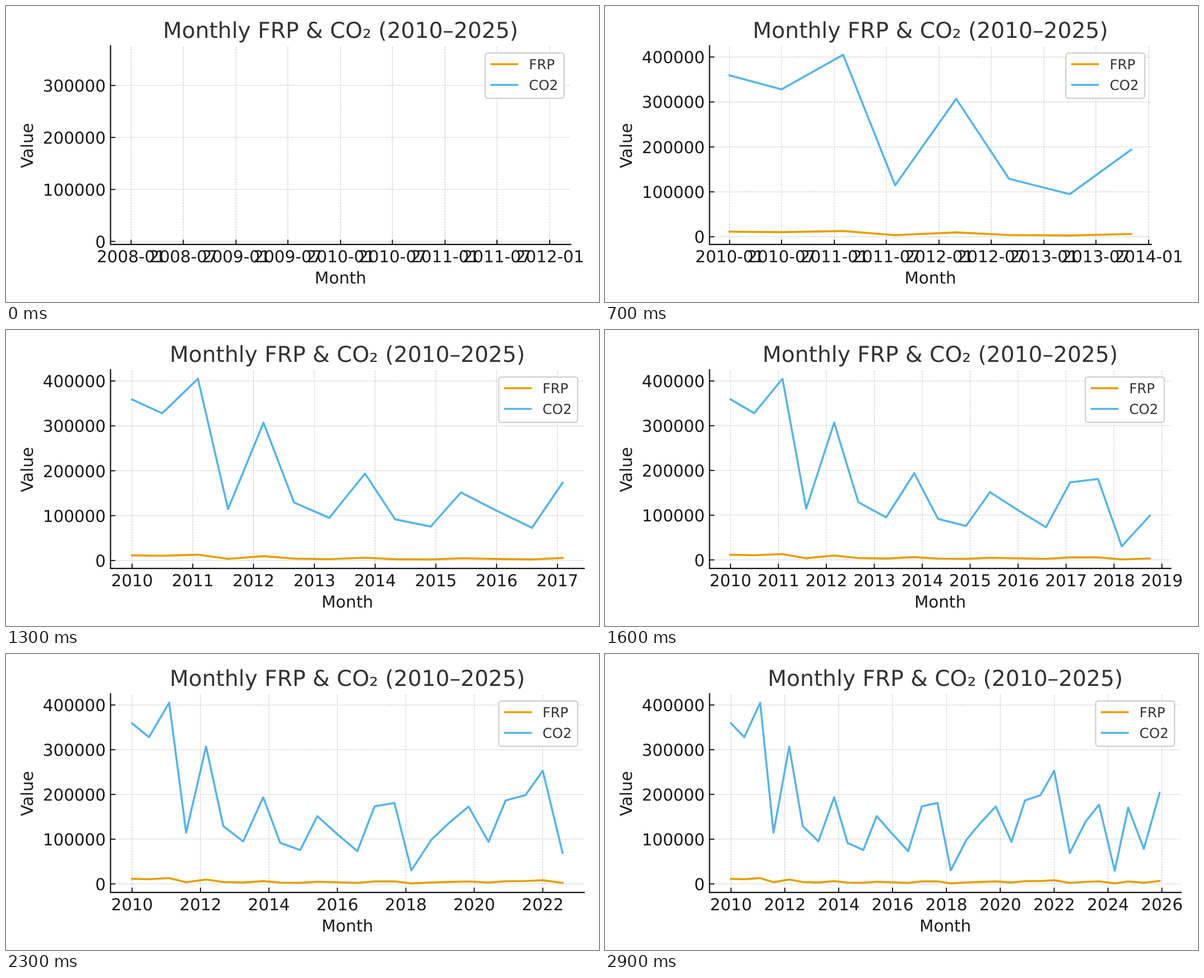
Recreate the animation shown at these times as an HTML page. Size 1058 by 529 pixels, loop 3000 ms.

```html
<!DOCTYPE html>
<html lang="en">
<head>
<meta charset="utf-8">
<title>Monthly FRP &amp; CO₂</title>
<style>
  html, body { margin: 0; width: 100%; height: 100%; overflow: hidden; background: #fff; }
  svg { display: block; font: 29.39px "DejaVu Sans", sans-serif; text-rendering: geometricPrecision; fill: #1a1a1a; }
  path { fill: none; }
  .grid { stroke: #c4c4c4; stroke-width: 1; stroke-dasharray: 3.3 1.5; }
  .axis { stroke: #111; stroke-width: 2.2; stroke-linecap: square; }
  .tick { stroke: #111; stroke-width: 1.9; }
  .line { stroke-width: 3.6; stroke-linejoin: round; stroke-linecap: square; }
  .key { stroke-width: 3.6; }
  .title { font-size: 39.18px; fill: #333; }
  .label { font-size: 24.49px; fill: #333; }
  .mid { text-anchor: middle; }
  .end { text-anchor: end; }
</style>
</head>
<body>
<svg id="chart" width="1058" height="529" viewBox="0 0 1058 529"></svg>
<script>
const FRP = '#e69f00', CO2 = '#56b4e9';
const LEFT = 186.5, TOP = 71, BOTTOM = 426.2, EDGE = 1031.5, FRAME_MS = 100;

// CO2 in thousands, sampled evenly over 192 months
const co2 = [359, 328, 405, 114.5, 307, 129, 95, 193.7, 91.7, 75.7, 151.5, 111, 73, 173.3, 181,
  30.3, 99, 135, 173, 94, 186.5, 198.5, 253, 69, 138.5, 177, 29.3, 170.5, 78.3, 203.5];
const RATIO = 0.0318, COUNT = co2.length;

const day = month => (Date.UTC(2010, month) - Date.UTC(2010, 0)) / 864e5;
const days = co2.map((_, i) => day(Math.floor(i * 191 / (COUNT - 1))));
const path = (cls, d, color) => `<path class="${cls}" d="${d}"${color ? ` stroke="${color}"` : ''}/>`;
const text = (cls, x, y, s, extra = '') => `<text class="${cls}" x="${x}" y="${y}" ${extra}>${s}</text>`;

// Tick spacing in months for a view of the given length
function tickStep(span) {
  const months = Math.floor(span / 30.4375);
  if (months >= 60) return months < 132 ? 12 : 24;
  return [1, 2, 3, 4, 6].find(s => months <= 11 * s);
}

function dateTicks(lo, hi) {
  const step = tickStep(hi - lo), ticks = [];
  for (let m = -24; day(m) <= hi; m += step) {
    if (day(m) < lo) continue;
    const iso = new Date(Date.UTC(2010, m)).toISOString();
    ticks.push({ at: day(m), name: iso.slice(0, step < 12 ? 7 : 4) });
  }
  return ticks;
}

function render(k) {
  const shown = co2.slice(0, k + 1);
  const [from, to] = k ? [0, days[k]] : [-730, 730];
  const padX = (to - from) * 0.05, lo = from - padX, hi = to + padX;
  const min = Math.min(...shown) * RATIO, max = Math.max(...shown);
  const padY = (max - min) * 0.05, bottom = min - padY, top = max + padY;

  // The plot shrinks so that the last date label stays inside the margin
  const ticks = dateTicks(lo, hi), last = ticks[ticks.length - 1];
  const half = last.name.length > 4 ? 61.5 : 37.9;
  const right = Math.min(EDGE, LEFT + (EDGE - half - LEFT) * (hi - lo) / (last.at - lo));
  const center = (LEFT + right) / 2;
  const X = d => LEFT + (d - lo) / (hi - lo) * (right - LEFT);
  const Y = v => BOTTOM - (v - bottom) / (top - bottom) * (BOTTOM - TOP);

  let grid = '', marks = '', labels = '';
  for (const { at, name } of ticks) {
    const x = X(at);
    grid += path('grid', `M${x} ${BOTTOM}V${TOP}`);
    marks += path('tick', `M${x} ${BOTTOM}v-8.6`);
    labels += text('mid', x, 457.8, name);
  }
  for (let v = 0; v < top; v += 100) {
    const y = Y(v);
    grid += path('grid', `M${LEFT} ${y}H${right}`);
    marks += path('tick', `M${LEFT} ${y}h8.6`);
    labels += text('end', 177.9, y + 11, v * 1000);
  }

  const series = (scale, color) => k
    ? path('line', 'M' + shown.map((v, i) => `${X(days[i])} ${Y(v * scale)}`).join('L'), color) : '';
  const legendRow = (name, y, color) =>
    path('key', `M${right - 143} ${y}h49.6`, color) + text('label', right - 74.2, y + 9, name);

  chart.innerHTML = grid + series(RATIO, FRP) + series(1, CO2) + marks
    + path('axis', `M${LEFT} ${TOP}V${BOTTOM}H${right}`) + labels
    + text('title mid', center, 56.5, 'Monthly FRP &amp; CO₂ (2010–2025)')
    + text('mid', center, 496, 'Month')
    + text('mid', 0, 0, 'Value', 'transform="translate(48 249.4) rotate(-90)"')
    + `<rect x="${right - 152.4}" y="84" width="140.8" height="81" rx="5"
        fill="#fff" fill-opacity=".9" stroke="#d2d2d2" stroke-width="2.4"/>`
    + legendRow('FRP', 104, FRP) + legendRow('CO2', 141, CO2);
}

const chart = document.getElementById('chart');
const start = performance.now();
let current = -1;

function tick() {
  const k = Math.floor((performance.now() - start) / FRAME_MS) % COUNT;
  if (k !== current) render(current = k);
  requestAnimationFrame(tick);
}
tick();
</script>
</body>
</html>
```
